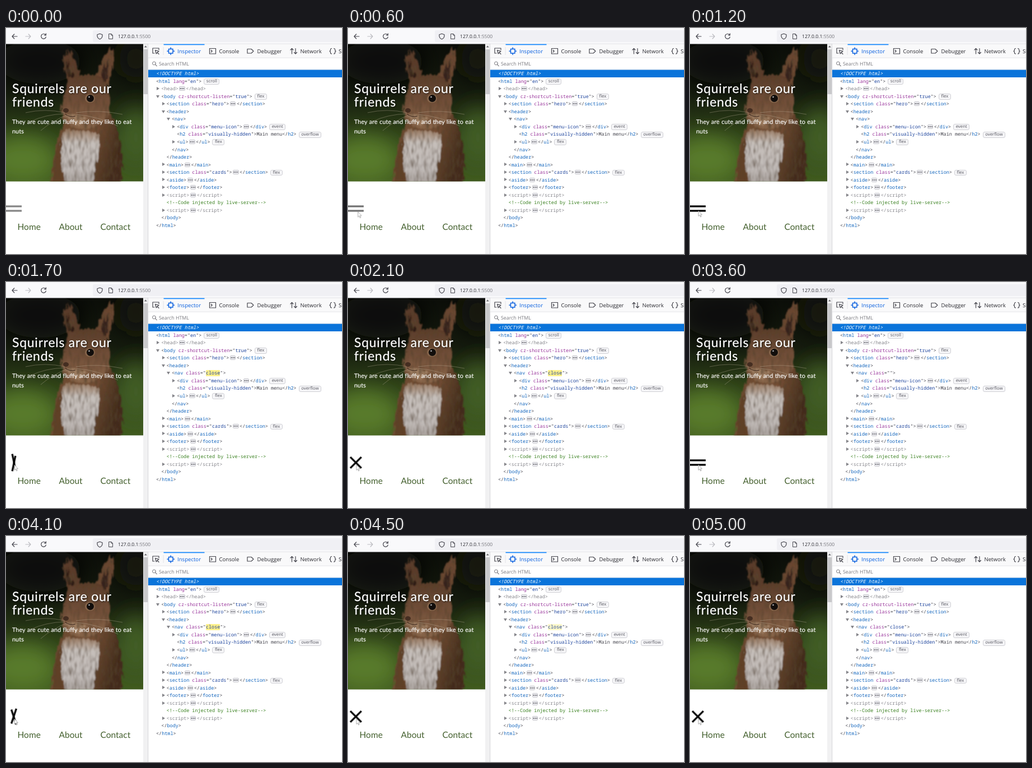
These frames come from a looping animation (600x403 px, 5100 ms). An HTML page:

```html
<!DOCTYPE html>
<html lang="en">
<head>
<meta charset="utf-8">
<title>Menu toggle demo</title>
<style>
  html, body { margin: 0; width: 100%; height: 100%; overflow: hidden; background: #fff; }
  body { position: relative; text-rendering: geometricPrecision; }
  #stage { position: absolute; left: 0; top: 0; width: 600px; height: 403px; overflow: hidden; }
  #stage > svg { position: absolute; left: 0; top: 0; }
  .ui { font-family: "Open Sans", "Noto Sans", sans-serif; font-size: 9.6px; fill: #2a2a30; }
  .page { font-family: Lato, sans-serif; }
  .icon { fill: none; stroke: #45454d; stroke-width: 1.2; stroke-linecap: round; stroke-linejoin: round; }

  #tree { font: 8.48px/13.55px "Noto Sans Mono", "DejaVu Sans Mono", monospace; color: #45454e; }
  .row { position: absolute; height: 13.55px; white-space: pre; }
  .tag { color: #1265bd; }
  .attr { color: #98339a; }
  .val { color: #1c439c; }
  .dim, .dim .tag { color: #85858b; }
  .comment { color: #39801f; }
  .picked { font-style: italic; color: #fff; }
  .row b { position: absolute; border: 3.5px solid transparent; }
  .row b.shut { left: -8px; top: 2.8px; border-left: 5px solid #85858a; border-right: 0; }
  .row b.open { left: -9px; top: 4px; border-top: 5px solid #85858a; border-bottom: 0; }
  .more { display: inline-block; box-sizing: border-box; width: 10.5px; height: 8px; margin: 0 1.5px;
    border: .6px solid #c9c9ce; border-radius: 2px; vertical-align: -1px;
    background: radial-gradient(circle, #3c3c44 .8px, transparent 1.1px) center / 2.8px 6px repeat-x #ececf0; }
  .badge { display: inline-block; margin-left: 4px; padding: 0 3.5px; border: .7px solid #cfcfd4;
    border-radius: 3px; background: #f6f6f8; color: #55555e; vertical-align: .6px;
    font: 7.8px/8.8px "Open Sans", "Noto Sans", sans-serif; }
  .nav { position: absolute; left: 0; top: 0; }

  .bar, .pointer, .nav, mark { animation: 5.1s infinite; }
  .bar { fill: #000; transform-box: fill-box; transform-origin: center; }
  .upper { --shift: 4px; --turn: 135deg; }
  .lower { --shift: -4px; --turn: -135deg; }
  .bar { animation-name: cross, darken; }
  .pointer { animation-name: approach; }
  .plain, .closed, .emptied { animation-timing-function: step-end; }
  .plain { animation-name: plain; }
  .closed { animation-name: closed; }
  .emptied { animation-name: emptied; }
  mark { color: inherit; border-radius: 1px; animation-name: flash; }

  @keyframes cross {
    0%, 29.4% { transform: translateY(0) rotate(0deg); }
    41.2%, 51.4% { transform: translateY(var(--shift)) rotate(var(--turn)); }
    63.1%, 74.5% { transform: translateY(0) rotate(0deg); }
    86.3%, 100% { transform: translateY(var(--shift)) rotate(var(--turn)); }
  }
  @keyframes darken {
    0%, 11% { fill: #858585; }
    17%, 100% { fill: #000; }
  }
  @keyframes approach {
    0% { transform: translate(130px, 78px); visibility: hidden; }
    2% { transform: translate(130px, 78px); visibility: visible; }
    14%, 100% { transform: translate(0, 0); visibility: visible; }
  }
  @keyframes plain {
    0% { visibility: visible; }
    29.4%, 100% { visibility: hidden; }
  }
  @keyframes closed {
    0% { visibility: hidden; }
    29.4% { visibility: visible; }
    51.4% { visibility: hidden; }
    74.5%, 100% { visibility: visible; }
  }
  @keyframes emptied {
    0% { visibility: hidden; }
    51.4% { visibility: visible; }
    74.5%, 100% { visibility: hidden; }
  }
  @keyframes flash {
    0%, 42% { background: #fff08a; }
    46%, 51.4% { background: #fff08a00; }
    51.5%, 87% { background: #fff08a; }
    91%, 100% { background: #fff08a00; }
  }
</style>
</head>
<body>
<div id="stage">
<svg width="600" height="403" viewBox="0 0 600 403">
  <defs>
    <linearGradient id="wood" x1="0" y1="0" x2="0" y2="1">
      <stop offset="0" stop-color="#0b0d08"/>
      <stop offset=".35" stop-color="#141a0d"/>
      <stop offset=".7" stop-color="#33491a"/>
      <stop offset="1" stop-color="#3f5a1f"/>
    </linearGradient>
    <linearGradient id="head" x1="0" y1="0" x2="0" y2="1">
      <stop offset="0" stop-color="#5a3c2a"/>
      <stop offset=".6" stop-color="#75523b"/>
      <stop offset="1" stop-color="#8a674b"/>
    </linearGradient>
    <linearGradient id="body" x1="0" y1="0" x2="1" y2=".3">
      <stop offset="0" stop-color="#6b4a30"/>
      <stop offset=".6" stop-color="#775036"/>
      <stop offset="1" stop-color="#422c1c"/>
    </linearGradient>
    <linearGradient id="belly" x1="0" y1="0" x2="0" y2="1">
      <stop offset="0" stop-color="#94745b"/>
      <stop offset=".25" stop-color="#c6bfba"/>
      <stop offset=".7" stop-color="#c2bcb9"/>
      <stop offset="1" stop-color="#a29a95"/>
    </linearGradient>
    <filter id="haze" x="-50%" y="-50%" width="200%" height="200%"><feGaussianBlur stdDeviation="18"/></filter>
    <filter id="fluff" x="-10%" y="-10%" width="120%" height="120%">
      <feTurbulence type="fractalNoise" baseFrequency=".22 .06" numOctaves="2" seed="4" result="hair"/>
      <feDisplacementMap in="SourceGraphic" in2="hair" scale="11" xChannelSelector="R" yChannelSelector="G" result="shape"/>
      <feColorMatrix in="hair" values="0 0 0 0 .1  0 0 0 0 .06  0 0 0 0 .03  1.8 0 0 0 -.75" result="shade"/>
      <feComposite in="shade" in2="shape" operator="in" result="strands"/>
      <feMerge result="coat"><feMergeNode in="shape"/><feMergeNode in="strands"/></feMerge>
      <feGaussianBlur in="coat" stdDeviation=".8"/>
    </filter>
    <clipPath id="hero"><rect y="28" width="245" height="245.5"/></clipPath>
  </defs>

  <rect width="600" height="403" fill="#fff"/>

  <!-- hero picture -->
  <g clip-path="url(#hero)">
    <rect y="28" width="245" height="246" fill="url(#wood)"/>
    <g filter="url(#haze)">
      <ellipse cx="30" cy="235" rx="62" ry="42" fill="#587a2a"/>
      <ellipse cx="232" cy="195" rx="30" ry="52" fill="#425f26"/>
      <ellipse cx="60" cy="60" rx="75" ry="40" fill="#090b07"/>
      <ellipse cx="232" cy="55" rx="30" ry="35" fill="#14180d"/>
    </g>
    <g filter="url(#fluff)">
      <path d="M113 98C104 82 101 62 105 44L108 50 111 36C121 55 131 72 133 92Z" fill="#5a3b29"/>
      <path d="M160 90C164 70 175 49 187 32L187 45 192 37C194 62 190 84 180 106Z" fill="#6b4733"/>
      <path d="M114 93Q106 77 108 58Q119 73 123 93Z" fill="#2e1e16"/>
      <path d="M166 92Q172 71 185 54Q185 78 176 99Z" fill="#35221a"/>
      <path d="M80 280C82 236 90 202 100 180L114 148 182 148C203 181 213 225 206 280Z" fill="url(#body)"/>
      <path d="M113 91C128 82 153 80 168 88C182 97 189 122 185 145C181 168 164 179 141 180C119 180 108 171 102 160C96 150 99 136 103 126C105 113 107 99 113 91Z" fill="url(#head)"/>
      <path d="M107 180C127 185 153 181 165 190C170 210 163 246 152 280H108C96 249 93 212 100 194Z" fill="url(#belly)"/>
      <path d="M105 155Q124 151 143 161Q136 175 119 171Z" fill="#a18064"/>
      <path d="M101 192Q83 221 82 280H104Q92 236 101 192Z" fill="#604128"/>
    </g>
    <ellipse cx="150" cy="125.500" rx="9" ry="8" fill="#9a785c" opacity=".55"/>
    <ellipse cx="150.500" cy="125.500" rx="6.500" ry="6.500" fill="#120e0c"/>
    <circle cx="148.500" cy="123" r="1.300" fill="#b9bcc0"/>
    <ellipse cx="107" cy="147" rx="5" ry="4" fill="#39251b" opacity=".8"/>
    <path d="M106 154Q115 160 124 157" fill="none" stroke="#39251b"/>
    <path d="M105 151Q70 143 35 151M105 153Q70 154 43 167M107 156Q82 166 62 183M125 151Q166 145 208 154M125 154Q166 158 200 175" fill="none" stroke="#c6b8a4" stroke-width=".6" opacity=".6"/>
  </g>

  <!-- page text -->
  <g class="page">
    <g font-size="23" letter-spacing=".75" fill="#fff" stroke="#fff" stroke-width=".25" style="filter:drop-shadow(1px 1px 1px #000a)">
      <text x="11" y="116">Squirrels are our</text>
      <text x="11" y="140">friends</text>
    </g>
    <g font-size="10.8" letter-spacing=".08" fill="#fff" stroke="#fff" stroke-width=".15" word-spacing=".5">
      <text x="11" y="171">They are cute and fluffy and they like to eat</text>
      <text x="11" y="187.500">nuts</text>
    </g>
    <g font-size="15.500" fill="#44602e">
      <text x="20.500" y="360">Home</text>
      <text x="94.500" y="360">About</text>
      <text x="168.500" y="360">Contact</text>
    </g>
  </g>

  <!-- menu icon -->
  <rect class="bar upper" y="316.400" width="28" height="3.200"/>
  <rect class="bar lower" y="324.400" width="28" height="3.200"/>
  <path class="pointer" d="M15 326V335.500L17.200 333.500 18.700 337 20.200 336.300 18.700 333H21.500Z" fill="#fff" stroke="#8b8b8b" stroke-width=".7"/>

  <!-- scrollbar -->
  <rect x="245" y="28" width="9" height="375" fill="#f1f1f2"/>
  <rect x="245.500" y="38" width="7.500" height="80" fill="#c9c9cb"/>
  <path d="M246.800 34.500L249.300 31.500 251.800 34.500Z" fill="#66666a"/>
  <path d="M253.700 28V403" stroke="#d4d4d8"/>

  <!-- address bar -->
  <rect width="600" height="28" fill="#f9f9fb"/>
  <rect x="155" y="4" width="460" height="21" rx="3" fill="#f0f0f4"/>
  <path d="M0 28.300H600" stroke="#d2d2d6" stroke-width=".8"/>
  <g class="icon">
    <path d="M20 15H11M14.800 11L11 15 14.800 19"/>
    <path d="M35 15H44M40.200 11L44 15 40.200 19" stroke="#bcbcc1"/>
    <path d="M70.700 12.300A4.400 4.400 0 1 0 71.400 16M71.400 9.800V13H68.200"/>
    <path d="M167.500 10.200L172 11.700V14Q172 18 167.500 20Q163 18 163 14V11.700Z"/>
    <path d="M184 10.500H188L190.500 13V19.500H184ZM188 10.500V13H190.500" stroke-width="1"/>
  </g>
  <text class="ui" x="200" y="18" style="font-size:8.6px">127.0.0.1<tspan fill="#77777d">:5500</tspan></text>

  <!-- inspector toolbar -->
  <rect x="254" y="28.700" width="346" height="24.300" fill="#f9f9fa"/>
  <path d="M254 53.200H600M254 74H600M281 34V48" stroke="#dedee2" stroke-width=".8"/>
  <rect x="281.500" y="28.700" width="73" height="1.600" fill="#0a84ff"/>
  <g class="icon">
    <path d="M265 45H262V36H273V39M266.500 39.500L268.300 46 270 43.700 273 46.500M266.500 39.500L273 41.600 270 43.700"/>
    <path d="M290.500 37.500H298V45H290.500ZM294.200 35V37.500M294.200 45V47.500M288 41.200H290.500M298 41.200H300.500" stroke="#0a60df" stroke-width="1.500"/>
    <path d="M363.500 36.500H374.500V46H363.500ZM366 39.300L368.200 41.200 366 43.200"/>
    <path d="M431 37.500H438L442 41.300 438 45H431Z"/>
    <path d="M510.500 46V36.500M508 39L510.500 36.500 513 39M517 36.500V46M514.500 43.500L517 46 519.500 43.500"/>
    <path d="M581.500 36.500Q579.500 36.500 579.500 38.500Q579.500 41 578 41.300Q579.500 41.600 579.500 44Q579.500 46 581.500 46M585.500 36.500Q587.500 36.500 587.500 38.500Q587.500 41 589 41.300Q587.500 41.600 587.500 44Q587.500 46 585.500 46"/>
    <circle cx="264.500" cy="63" r="2.900" stroke="#77777d" stroke-width="1"/>
    <path d="M266.700 65.200L269.200 67.800" stroke="#77777d"/>
  </g>
  <g class="ui">
    <text x="306" y="44.500" fill="#0a60df">Inspector</text>
    <text x="380.500" y="44.500">Console</text>
    <text x="448.500" y="44.500">Debugger</text>
    <text x="525.500" y="44.500">Network</text>
    <text x="594" y="44.500">Storage</text>
    <text x="273" y="67" fill="#77777d" style="font-size:8.8px">Search HTML</text>
  </g>
  <rect x="254" y="74.600" width="346" height="13.400" fill="#0a74da"/>
</svg>
<div id="tree"></div>
</div>

<script>
  // Each row: indent level, arrow state, markup; "…" is a folded part, "[x]" a badge.
  const rows = [
    [0, "", "<!DOCTYPE html>", "picked"],
    [0, "", '<html lang="en">[scroll]'],
    [1, "shut", "<head>…</head>", "dim"],
    [1, "open", '<body cz-shortcut-listen="true">[flex]'],
    [2, "shut", '<section class="hero">…</section>'],
    [2, "open", "<header>"],
    [3, "open", ""],
    [4, "shut", '<div class="menu-icon">…</div>[event]'],
    [4, "", '<h2 class="visually-hidden">Main menu</h2>[overflow]'],
    [4, "shut", "<ul>…</ul>[flex]"],
    [3, "", "</nav>"],
    [2, "", "</header>"],
    [2, "shut", "<main>…</main>"],
    [2, "shut", '<section class="cards">…</section>[flex]'],
    [2, "shut", "<aside>…</aside>"],
    [2, "shut", "<footer>…</footer>"],
    [2, "shut", "<script>…<\/script>", "dim"],
    [2, "", "<!--Code injected by live-server-->", "comment"],
    [2, "shut", "<script>…<\/script>", "dim"],
    [1, "", "</body>"],
    [0, "", "</html>"]
  ];

  const span = (name, text) => `<span class="${name}">${text}</span>`;
  const escape = text => text.replace(/</g, "&lt;").replace(/>/g, "&gt;");

  function paint(code) {
    const token = /(<\/?)(\w+)|([\w-]+)="([^"]*)"|…|\[(\w+)\]|>/g;
    return code.replace(token, (all, mark, tag, attr, val, badge) => {
      if (tag) return escape(mark) + span("tag", tag);
      if (attr) return span("attr", attr) + '="' + span("val", val) + '"';
      if (badge) return span("badge", badge);
      return all === "…" ? span("more", "") : "&gt;";
    });
  }

  const navStates =
    span("nav plain", paint("<nav>")) +
    span("nav closed", paint('<nav class="close">').replace("close", "<mark>close</mark>")) +
    span("nav emptied", paint('<nav class="">'));

  document.getElementById("tree").innerHTML = rows.map(([level, arrow, code, look = ""], i) => {
    const left = 268 + level * 9.3, top = 75 + i * 13.55;
    const flat = look === "picked" || look === "comment";
    const body = !code ? navStates : flat ? escape(code) : paint(code);
    const toggle = arrow ? `<b class="${arrow}"></b>` : "";
    return `<div class="row ${look}" style="left:${left}px;top:${top}px">${toggle}${body}</div>`;
  }).join("");
</script>
</body>
</html>
```
